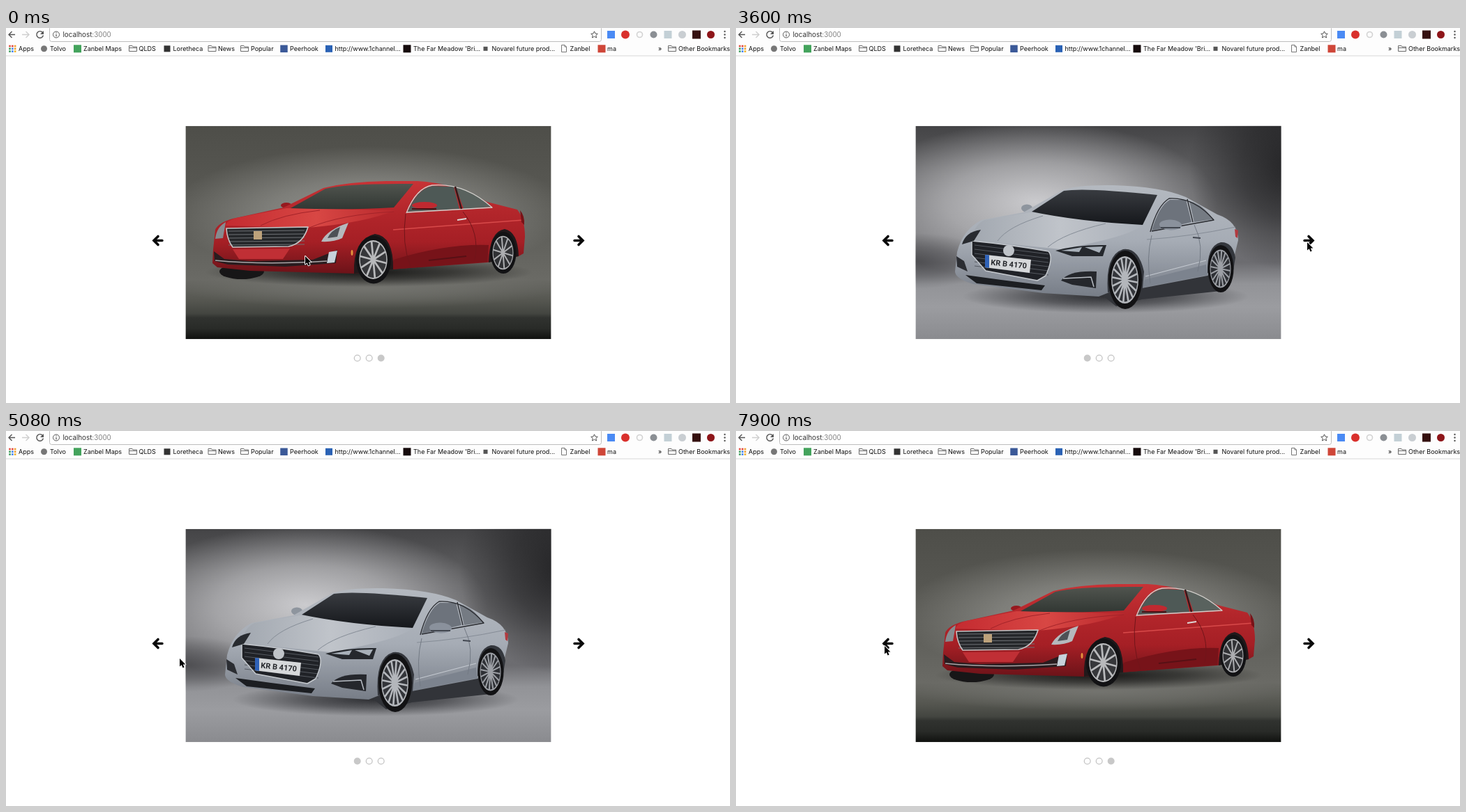
Write an HTML page with a canvas that moves like this. It is 1038 px wide and 539 px high and loops after 8000 ms.

```html
<!DOCTYPE html>
<html lang="en">
<head>
<meta charset="utf-8">
<title>Carousel</title>
<style>
  html, body { margin: 0; width: 100%; height: 100%; overflow: hidden; background: #fff; }
  #stage { position: relative; width: 1038px; height: 539px; overflow: hidden; }
  canvas { position: absolute; left: 0; top: 0; }
  span { position: absolute; white-space: pre; color: #111; font: 9px/12px Inter, Roboto, sans-serif; }
  .url { font-size: 9.8px; color: #333; }
  .url i { font-style: normal; color: #808080; }
</style>
</head>
<body>
<div id="stage"><canvas id="view" width="1038" height="539"></canvas></div>
<script>
const W = 1038, H = 539, LOOP = 8000;
const BOX = { x: 257.4, y: 140.8, w: 524.2, h: 306.4 };
const stage = document.getElementById('stage');
const view = document.getElementById('view').getContext('2d');

// ---------- drawing helpers ----------
function layer(paint) {
  const c = document.createElement('canvas');
  c.width = W;
  c.height = H;
  paint(c.getContext('2d'));
  return c;
}
function fill(g, color, d) {
  g.fillStyle = color;
  g.fill(new Path2D(d));
}
function line(g, color, width, d) {
  g.strokeStyle = color;
  g.lineWidth = width;
  g.stroke(new Path2D(d));
}
function oval(g, color, x, y, rx, ry = rx, turn = 0) {
  g.fillStyle = color;
  g.beginPath();
  g.ellipse(x, y, rx, ry, turn, 0, 7);
  g.fill();
}
function ring(g, color, width, x, y, r) {
  g.strokeStyle = color;
  g.lineWidth = width;
  g.beginPath();
  g.arc(x, y, r, 0, 7);
  g.stroke();
}
function square(g, color, x, y, size) {
  g.fillStyle = color;
  g.fillRect(x - size / 2, y - size / 2, size, size);
}
function ramp(g, stops) {
  const shade = g.createLinearGradient(0, BOX.y, 0, BOX.y + BOX.h);
  stops.forEach(([at, color]) => shade.addColorStop(at, color));
  g.fillStyle = shade;
  g.fillRect(BOX.x, BOX.y, BOX.w, BOX.h);
}
function glow(g, rgb, alpha, x, y, rx, ry) {
  const shade = g.createRadialGradient(0, 0, 0, 0, 0, 1);
  shade.addColorStop(0, `rgba(${rgb},${alpha})`);
  shade.addColorStop(0.5, `rgba(${rgb},${alpha * 0.6})`);
  shade.addColorStop(1, `rgba(${rgb},0)`);
  g.save();
  g.translate(x, y);
  g.scale(rx, ry);
  g.fillStyle = shade;
  g.fillRect(-1, -1, 2, 2);
  g.restore();
}
function tint(g, x0, y0, x1, y1, ...colors) {
  const shade = g.createLinearGradient(x0, y0, x1, y1);
  colors.forEach((c, i) => shade.addColorStop(i / (colors.length - 1), c));
  return shade;
}
function wheel(g, x, y, rx, ry, spokes, metal, gap) {
  oval(g, '#121214', x, y, rx, ry);
  oval(g, metal, x - 0.5, y, rx * 0.81, ry * 0.81);
  oval(g, gap, x - 0.5, y, rx * 0.75, ry * 0.75);
  g.strokeStyle = metal;
  g.lineWidth = rx * 0.11;
  g.beginPath();
  for (let i = 0; i < spokes; i++) {
    const a = (i + 0.3) / spokes * Math.PI * 2;
    g.moveTo(x - 0.5, y);
    g.lineTo(x - 0.5 + Math.cos(a) * rx * 0.77, y + Math.sin(a) * ry * 0.77);
  }
  g.stroke();
  oval(g, metal, x - 0.5, y, rx * 0.15, ry * 0.13);
}
function photo(paint) {
  return layer(g => {
    g.beginPath();
    g.rect(BOX.x, BOX.y, BOX.w, BOX.h);
    g.clip();
    g.lineJoin = 'round';
    paint(g);
  });
}

// ---------- slides ----------
const silver = photo(g => {
  ramp(g, [[0, '#444446'], [0.2, '#5d5d5f'], [0.5, '#707073'], [0.64, '#6c6c70'], [0.74, '#929397'], [0.85, '#9b9ca0'], [1, '#8a8b8f']]);
  glow(g, '208,208,211', 0.95, 430, 250, 260, 115);
  glow(g, '32,32,34', 0.95, 800, 200, 150, 150);
  glow(g, '48,48,51', 0.5, 257, 335, 110, 40);
  glow(g, '35,36,40', 0.9, 530, 386, 205, 24);
  fill(g, '#323439', 'M345 362L525 384L545 400L582 390L695 378L680 350Z');
  oval(g, '#8e959e', 417, 259, 8, 5.5);
  fill(g, tint(g, 0, 226, 0, 386, '#b4b9c0', '#a6acb5', '#777d87'),
    'M317 322Q325 290 352 276L412 265L468 233Q490 225 540 226Q610 228 645 243L690 268Q720 278 720 305L714 330L676 356L582 374L540 378L520 386L440 381L340 368Q314 360 314 350Z');
  fill(g, tint(g, 340, 0, 590, 0, '#a2a8b0', '#c0c4ca', '#a9afb8'), 'M340 305Q338 286 356 276L422 265L583 283Q565 300 465 318Z');
  line(g, '#858c96', 1, 'M375 306Q390 285 440 270M447 315Q470 295 530 281M589 304Q650 300 716 286');
  fill(g, tint(g, 0, 232, 0, 283, '#393c41', '#15171b'), 'M424 264L470 234Q500 229 604 240L583 283Q490 278 424 264Z');
  fill(g, '#6d737c', 'M596 291Q607 255 622 247L645 247L653 279L636 283Z');
  fill(g, '#757b83', 'M650 249Q669 253 684 275L657 279Z');
  line(g, '#282a2f', 1.4, 'M594 293Q604 255 621 245Q657 243 685 276L596 292M647 246L655 279');
  fill(g, '#7c838e', 'M586 362L674 340L676 355L582 373Z');
  line(g, '#c4c9d0', 1.2, 'M587 357L674 334');
  line(g, '#737a84', 1, 'M596 298Q588 330 594 367M657 283Q672 312 662 350');
  oval(g, '#8a919c', 623, 283, 16, 7.5, 0.05);
  line(g, '#424750', 2, 'M609 287L637 287M655 301L666 302');
  fill(g, '#202227', 'M338 306Q390 311 448 321Q456 330 444 356L432 363L358 349L338 326Z');
  for (let i = 0; i < 6; i++) line(g, '#555960', 1, `M342 ${312 + i * 6}L448 ${325 + i * 6}`);
  line(g, '#c5c9ce', 1.5, 'M338 306Q390 311 448 321Q456 330 444 356L432 363L358 349L338 326Z');
  oval(g, '#bfc3c8', 391, 320, 8);
  fill(g, '#d6d8da', 'M357 326L423 333L421 352L357 344Z');
  fill(g, '#2f62b8', 'M357 326L363 326.6L363 344.8L357 344Z');
  g.save();
  g.translate(365, 340.5);
  g.rotate(0.1);
  g.fillStyle = '#26282c';
  g.font = 'bold 11px Roboto, sans-serif';
  g.fillText('KR B 4170', 0, 0);
  g.restore();
  fill(g, '#25282d', 'M458 320Q490 311 531 312L526 328L482 328Z');
  fill(g, '#a8b0b9', 'M466 320L496 315L492 322ZM500 315L526 314L521 323Z');
  fill(g, '#282b30', 'M324 311Q329 293 351 290L341 306Z');
  fill(g, '#25272c', 'M466 363Q478 348 517 350L516 374L482 369Z');
  line(g, '#b8bdc4', 1.5, 'M469 360L509 358L513 372');
  fill(g, '#2b2d32', 'M316 328L327 335L332 350L317 343Z');
  fill(g, '#1c1e22', 'M329 355L380 362L443 370L438 377L345 367Z');
  fill(g, '#34373d', 'M533 380Q529 326 555 318Q577 315 585 350L583 374ZM676 352Q675 313 695 308Q712 307 716 330L712 354Z');
  wheel(g, 558, 362, 24, 42, 16, '#b3b6bb', '#33353a');
  wheel(g, 695, 346, 18.5, 34, 16, '#9c9fa5', '#2e3035');
  fill(g, '#b23a3f', 'M715 289L720 291L719 302L716 300Z');
});

const dark = photo(g => {
  ramp(g, [[0, '#050507'], [0.3, '#070709'], [0.65, '#050506'], [0.85, '#08080a'], [1, '#040405']]);
  glow(g, '54,54,58', 0.9, 490, 246, 265, 118);
  glow(g, '58,58,61', 0.75, 480, 408, 190, 44);
  glow(g, '0,0,0', 0.95, 520, 384, 240, 19);
  fill(g, tint(g, 295, 0, 746, 0, '#3c3c3e', '#5a5a5b', '#3f3f41', '#2a2a2c', '#161618'),
    'M294 358L303 322Q310 308 360 294L425 285L485 257Q530 249 610 250Q660 254 704 278L736 289Q746 303 745 340L738 350L700 361L556 377L500 383L400 385L330 379L296 371Z');
  // flank and sill
  fill(g, tint(g, 0, 286, 0, 376, '#3a3a3c', '#434345', '#1c1c1e', '#0f0f10', '#19191b'),
    'M565 291L702 287L736 290Q746 303 745 340L738 350L700 361L556 377Q556 330 530 320Z');
  glow(g, '0,0,0', 0.7, 715, 325, 60, 45);
  // bonnet
  fill(g, tint(g, 310, 310, 580, 290, '#4b4b4c', '#747475', '#6a6a6b', '#454546'), 'M310 319Q330 302 426 286L565 290Q520 307 410 322Z');
  line(g, '#3c3c3d', 1.2, 'M385 318Q410 300 480 291M410 323Q490 316 570 292');
  line(g, '#8d8d8e', 1, 'M350 306Q390 294 440 289');
  fill(g, tint(g, 0, 340, 0, 384, 'rgba(20,20,21,0)', 'rgba(14,14,15,.75)'), 'M382 342L500 336V383L400 385L330 379L296 371V360Z');
  // glass
  fill(g, '#141416', 'M424 286L487 258Q520 253 597 253L561 289Q490 290 424 286Z');
  glow(g, '70,70,72', 0.5, 510, 272, 55, 14);
  line(g, '#6c6c6e', 1, 'M485 257Q530 249 610 250Q660 254 704 278');
  fill(g, '#121214', 'M588 290Q600 262 620 257L649 259L667 289ZM653 260Q681 266 702 286L671 289Z');
  line(g, '#8d8d8f', 1.2, 'M582 293Q597 260 618 256Q664 253 702 287');
  line(g, '#4a4a4c', 1, 'M588 293L702 287M560 375L699 357');
  line(g, '#161618', 1, 'M576 299Q567 335 577 370M669 292Q682 320 671 355');
  line(g, '#58585a', 1.2, 'M575 308Q650 302 738 297');
  oval(g, '#59595b', 608, 287, 18, 6, 0.08);
  fill(g, '#1a1a1c', 'M591 289Q608 296 626 290L624 293H594Z');
  line(g, '#909092', 1.5, 'M656 304L670 303');
  line(g, '#707072', 1.2, 'M560 329L578 325');
  // grille and lamps
  fill(g, '#131315', 'M316 323L410 322Q411 337 399 346L335 344Q320 337 316 323Z');
  for (let x = 322; x < 406; x += 5) line(g, '#69696b', 1.2, `M${x} 326L${x + 1} 342`);
  line(g, '#a0a0a2', 1.2, 'M316 323L410 322Q411 337 399 346L335 344Q320 337 316 323Z');
  oval(g, '#8296ae', 359, 321, 4.5);
  fill(g, '#aaaaa8', 'M323 345L382 350L380 364L323 359Z');
  line(g, '#6d6d6e', 2, 'M329 354L376 358');
  fill(g, '#161719', 'M409 333L440 324L497 321L479 339L430 342Z');
  line(g, '#d5dce3', 2, 'M426 332L434 338L446 337L450 329M453 330L460 336L471 334L477 326');
  line(g, '#8f9499', 1, 'M412 333L441 326L490 323');
  fill(g, '#c5ccd4', 'M304 322L313 320L316 331L308 333Z');
  fill(g, '#0d0d0e', 'M297 355L322 364L390 369L403 364L474 359L474 376L400 380L322 374L297 368Z');
  line(g, '#7d7d7f', 1.4, 'M296 370L328 376L398 381L470 377Q478 369 472 360L408 363');
  fill(g, '#0e0e0f', 'M498 382Q497 322 530 319Q559 324 557 377ZM698 360Q699 312 721 310Q742 314 739 351Z');
  wheel(g, 528, 359, 26, 36, 10, '#777779', '#111113');
  wheel(g, 719, 342, 18.5, 27, 10, '#626264', '#0e0e10');
  line(g, '#6b2222', 2, 'M738 292L742 302');
});

const red = photo(g => {
  ramp(g, [[0, '#4e4e49'], [0.25, '#565651'], [0.5, '#5f5f5a'], [0.72, '#6a6a65'], [0.82, '#555650'], [0.88, '#434540'], [0.9, '#30322f'], [0.95, '#292b28'], [1, '#10110f']]);
  glow(g, '165,165,161', 0.8, 520, 265, 285, 95);
  glow(g, '130,130,126', 0.55, 520, 375, 270, 28);
  glow(g, '20,20,19', 0.95, 520, 351, 235, 21);
  oval(g, '#171617', 338, 350, 32, 11);
  oval(g, '#96191f', 402, 255, 8, 4);
  fill(g, tint(g, 0, 220, 0, 352, '#c83336', '#b3262b', '#a51f25', '#6d1319'),
    'M297 318L300 290Q304 280 325 274L398 258L455 230Q490 221 545 220L590 220Q640 222 690 250L733 261Q744 275 744 300L742 324L735 328L690 337L552 347L500 353L350 349L303 344L296 338Z');
  fill(g, tint(g, 320, 0, 570, 0, '#c52c31', '#d84744', '#b5252a'), 'M315 284Q316 277 330 273L402 259L558 262Q515 280 433 287Z');
  line(g, '#a32329', 1, 'M365 284Q395 268 450 262M435 287Q480 268 556 264');
  fill(g, tint(g, 0, 222, 0, 262, '#525650', '#303632'), 'M408 259L458 231Q490 223 584 224L556 258Q490 262 408 259Z');
  fill(g, '#4e5956', 'M576 264Q590 230 612 227L642 228L650 260Z');
  fill(g, '#59625e', 'M645 229Q673 236 696 257L656 260Z');
  line(g, '#d1cfcb', 1.3, 'M574 266Q588 230 611 226Q657 222 697 258L574 265');
  line(g, '#35181a', 2.5, 'M644 228L653 260');
  fill(g, '#771319', 'M556 333Q630 310 692 312L690 336L552 347Z');
  line(g, '#d84a4a', 1.4, 'M555 290Q650 283 742 276');
  line(g, '#71151a', 1, 'M573 267Q567 310 580 343M655 264Q680 295 672 333');
  line(g, '#571015', 2, 'M606 334L660 328');
  oval(g, '#bf2930', 600, 255, 18, 5);
  line(g, '#4b1115', 2, 'M582 260L617 260');
  line(g, '#ddd8d6', 2, 'M647 276L660 274');
  fill(g, '#25272a', 'M316 288L433 286Q426 310 405 314L325 315Q317 304 316 288Z');
  for (let y = 292; y < 313; y += 5) line(g, '#6e7175', 1, `M319 ${y}L428 ${y - 1}`);
  line(g, '#c6c4c5', 1.6, 'M316 288L433 286Q426 310 405 314L325 315Q317 304 316 288Z');
  square(g, '#bda27b', 361, 298, 12);
  fill(g, '#b5b9bd', 'M452 307Q460 290 491 280L482 302Q470 308 452 307Z');
  fill(g, '#4d5156', 'M461 302Q466 291 479 286L475 300Z');
  fill(g, '#878b8f', 'M300 303Q302 286 315 279L311 302Z');
  fill(g, '#c02f35', 'M325 318L407 317L397 332L334 332Z');
  fill(g, '#291c1f', 'M298 321L313 332L350 335L440 333L475 319L473 338L400 343L318 340L299 335Z');
  line(g, '#aaa6a8', 1.3, 'M300 334Q370 341 460 335');
  fill(g, '#c7d2db', 'M463 322L475 320L471 337L460 338Z');
  oval(g, '#e4963c', 496, 323, 1.5, 4);
  fill(g, '#21191b', 'M499 353Q497 303 529 296Q556 299 555 347ZM692 337Q693 292 715 289Q734 293 735 328Z');
  wheel(g, 527, 333, 25, 34.5, 10, '#b8b9bb', '#36373a');
  wheel(g, 713, 323, 18.5, 30, 10, '#acadb0', '#303134');
  fill(g, '#791217', 'M737 262Q744 270 743 283L739 279Z');
});

const photos = [silver, dark, red];

// ---------- browser bar and page ----------
function folder(g, x) {
  line(g, '#6b6b6b', 1, `M${x - 5.5} 26V33.5H${x + 5.5}V27H${x}L${x - 1} 25.5H${x - 5.5}ZM${x - 5.5} 28.5H${x + 5.5}`);
}
function arrow(g, x, dir) {
  g.save();
  g.translate(x, 305.5);
  g.scale(dir, 1);
  g.lineCap = 'round';
  line(g, '#0a0a0a', 3.4, 'M-6 0H5');
  line(g, '#0a0a0a', 3.6, 'M0 -6L6 0L0 6');
  g.restore();
}
const page = layer(g => {
  g.fillStyle = '#fff';
  g.fillRect(0, 0, W, H);
  g.fillStyle = '#fdfdfd';
  g.fillRect(0, 0, W, 40);
  g.fillStyle = '#d8d8d8';
  g.fillRect(0, 39.5, W, 1);
  g.fillStyle = '#fff';
  g.beginPath();
  g.roundRect(62.5, -2.5, 791, 22, 3);
  g.fill();
  g.strokeStyle = '#bdbdbd';
  g.stroke();

  line(g, '#555', 1.4, 'M13 9.5H4M8.5 5L4 9.5L8.5 14');
  line(g, '#cfcfcf', 1.4, 'M23 9.5H33M28.5 5L33 9.5L28.5 14');
  line(g, '#555', 1.4, 'M52.5 6.5A4.8 4.8 0 1 0 53.4 10.5');
  fill(g, '#555', 'M54 4V9H49Z');
  ring(g, '#555', 1, 72, 9.5, 4.5);
  line(g, '#555', 1.2, 'M72 9V12.2M72 6.6V7.8');
  line(g, '#555', 1, 'M843.5 4.8L845 8L848.3 8.3L845.8 10.6L846.6 14L843.5 12.2L840.4 14L841.2 10.6L838.7 8.3L842 8Z');

  square(g, '#4a8af4', 867.5, 9.5, 11);
  oval(g, '#d9302c', 888, 9.5, 6);
  ring(g, '#d2d2d2', 1.6, 908.5, 9.5, 4);
  oval(g, '#8b8f94', 928.5, 9.5, 5);
  square(g, '#c3d0d6', 949, 9.5, 11);
  oval(g, '#c9ced2', 969.5, 9.5, 5.5);
  square(g, '#35100f', 990, 9.5, 12);
  oval(g, '#8e1519', 1010.5, 9.5, 5.5);
  [5, 9.5, 14].forEach(y => oval(g, '#555', 1030.5, y, 1.2));

  const hues = ['#e2483d', '#e2483d', '#f0a030', '#3c9d57', '#4285f4', '#f0a030', '#3c9d57', '#4285f4', '#f0b428'];
  hues.forEach((c, i) => square(g, c, 5.5 + i % 3 * 3.8, 26 + Math.floor(i / 3) * 3.8, 2.6));
  oval(g, '#777', 54.5, 29.8, 4.5);
  square(g, '#43a35c', 102.5, 29.8, 11);
  square(g, '#333', 231, 29.8, 9);
  square(g, '#3b5998', 398.5, 29.8, 10.5);
  square(g, '#2a62b5', 463, 29.8, 10);
  square(g, '#160b0c', 575, 29.8, 11);
  square(g, '#555', 687.5, 29.8, 6);
  square(g, '#cf4638', 854, 29.8, 11);
  [182, 295.5, 342, 955].forEach(x => folder(g, x));
  line(g, '#777', 1, 'M796.5 24.5H801L803.5 27V34.5H796.5ZM801 24.5V27H803.5');

  arrow(g, 218, -1);
  arrow(g, 821, 1);
});

function label(x, y, html, kind = '') {
  const s = document.createElement('span');
  s.className = kind;
  s.style.left = x + 'px';
  s.style.top = y + 'px';
  s.innerHTML = html;
  stage.append(s);
}
label(81.5, 3.5, 'localhost<i>:3000</i>', 'url');
[[18, 'Apps'], [63, 'Tolvo'], [111, 'Zanbel Maps'], [190.5, 'QLDS'], [239.5, 'Loretheca'], [304, 'News'],
 [351, 'Popular'], [407, 'Peerhook'], [471.5, 'http://www.1channel...'], [584, "The Far Meadow 'Bri..."],
 [696.5, 'Novarel future prod...'], [808.5, 'Zanbel'], [862, 'ma'], [935, '»'], [964, 'Other Bookmarks']
].forEach(([x, text]) => label(x, 24, text));

// ---------- timeline ----------
// start, slide, active dot
const slides = [[0, 2, 2], [1980, 0, 0], [4050, 1, 1], [4490, 1, 2], [4640, 2, 2], [4790, 0, 0], [6720, 1, 1], [7310, 1, 2], [7460, 2, 2]];
// first step, last step, steps, end x, end y, bend
const moves = [
  [150, 480, 3, 508, 382, -25],
  [780, 780, 1, 392, 441, 0],
  [930, 930, 1, 481, 423, 0],
  [2130, 3010, 7, 718, 289, 0],
  [3160, 3600, 4, 819, 308, 0],
  [4790, 5080, 3, 249, 327, 0],
  [5380, 5530, 2, 219, 305, 0],
  [5680, 6420, 6, 829, 300, -42],
  [6570, 6570, 1, 815, 304, 0],
  [7610, 7900, 3, 213, 309, 0]
];

function pointer(t) {
  let x = 429, y = 328;
  for (const [t0, t1, n, ex, ey, bend] of moves) {
    if (t < t0) break;
    const step = n > 1 ? (t1 - t0) / (n - 1) : 1;
    const k = Math.min(n, 1 + Math.floor((t - t0) / step + 0.02));
    const u = k / n, p = u * u * (3 - 2 * u);
    x += (ex - x) * p;
    y += (ey - y) * p + bend * 4 * u * (1 - u);
  }
  return [Math.round(x), Math.round(y)];
}

function draw(t) {
  const [, slide, active] = slides.findLast(s => s[0] <= t);
  view.drawImage(page, 0, 0);
  view.drawImage(photos[slide], 0, 0);
  for (let i = 0; i < 3; i++) {
    const x = 503.7 + i * 17;
    if (i === active) oval(view, '#c8c8c8', x, 474.5, 5);
    else ring(view, '#c4c4c4', 1.3, x, 474.5, 4.4);
  }
  const [x, y] = pointer(t);
  const shape = 'M0 0V11.5L2.7 9.2L4.6 13.4L6.6 12.5L4.8 8.4H8.4Z';
  view.save();
  view.translate(x, y);
  view.lineJoin = 'round';
  line(view, '#fff', 1.8, shape);
  fill(view, '#000', shape);
  view.restore();
}

function tick() {
  draw(performance.now() % LOOP);
  requestAnimationFrame(tick);
}
tick();
</script>
</body>
</html>
```
